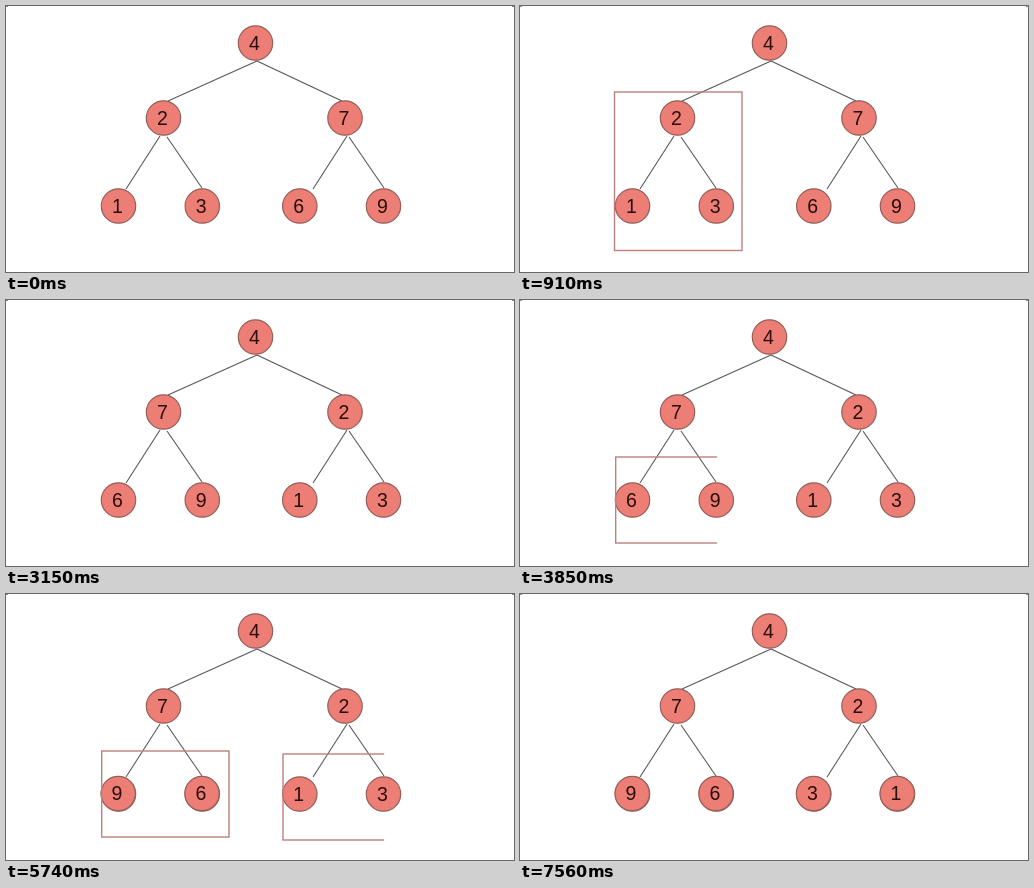
Animation, 508 px wide and 266 px high, one loop 7910 ms. Source, as an HTML page with a canvas:

```html
<!DOCTYPE html>
<html lang="en">
<head>
<meta charset="utf-8">
<title>Inverting a binary tree</title>
<style>
  html, body { margin: 0; width: 100%; height: 100%; overflow: hidden; background: #fff; }
  canvas { display: block; width: 508px; height: 266px; }
</style>
</head>
<body>
<canvas id="stage"></canvas>
<script>
const W = 508, H = 266, LOOP = 7910;
const canvas = document.getElementById('stage');
const ratio = window.devicePixelRatio || 1;
canvas.width = W * ratio;
canvas.height = H * ratio;
const ctx = canvas.getContext('2d');
ctx.scale(ratio, ratio);

// Node centres, level by level
const nodes = [
  [249.5, 37], [157.5, 112], [339, 112],
  [112.5, 200], [196.3, 200], [293.8, 200], [377.5, 200]
];
const edges = [
  [251, 55, 162, 95], [251, 55, 336, 95],
  [154, 130, 120, 183], [161, 131, 196, 182],
  [341, 130, 307, 183], [343, 131, 378, 182]
];

// Highlight boxes: left, top, right, bottom, then first and last moment
const boxes = [
  { rect: [94.5, 86, 222, 244.5], from: 350, until: 2030 },
  { rect: [275.5, 87.5, 403, 246], from: 980, until: 2030 },
  { rect: [95.7, 157, 223, 243], from: 3500, until: 7490 },
  { rect: [277, 160, 404, 246], from: 5390, until: 7490 }
];
const WIPE = 490;
const SUBTREE_SWAP = 2030;
const leafSwaps = [
  { at: 4340, first: 3, labels: '96' },
  { at: 6370, first: 5, labels: '31' }
];
const SWAP_TIME = 210;

const clamp = v => Math.max(0, Math.min(1, v));

function drawEdge([x1, y1, x2, y2]) {
  ctx.beginPath();
  ctx.moveTo(x1, y1);
  ctx.lineTo(x2, y2);
  ctx.stroke();
}

function drawDisc(x, y) {
  ctx.beginPath();
  ctx.arc(x, y, 17.2, 0, Math.PI * 2);
  ctx.fillStyle = '#ed7e75';
  ctx.fill();
  ctx.strokeStyle = '#965f5a';
  ctx.lineWidth = 1.2;
  ctx.stroke();
}

function drawNode([x, y], label) {
  drawDisc(x, y);
  ctx.fillStyle = '#2b0f0d';
  ctx.fillText(label, x - 1.2, y + 6.6);
}

function drawBox({ rect: [l, t, r, b], from, until }, time) {
  if (time < from || time >= until) return;
  const shown = clamp((time - from + 35) / WIPE);
  ctx.save();
  ctx.beginPath();
  ctx.rect(l - 2, t - 2, (r - l + 4) * shown, b - t + 4);
  ctx.clip();
  ctx.strokeStyle = '#bd807d';
  ctx.lineWidth = 1.4;
  ctx.strokeRect(l, t, r - l, b - t);
  ctx.restore();
}

function drawCorners() {
  ctx.fillStyle = '#8c8c8c';
  ctx.fillRect(0, 0, 2, 1);
  ctx.fillRect(W - 2, 0, 2, 1);
}

function draw(time) {
  ctx.fillStyle = '#fff';
  ctx.fillRect(0, 0, W, H);
  drawCorners();

  ctx.font = '19.5px "Liberation Sans", Arial, sans-serif';
  ctx.textAlign = 'center';
  ctx.strokeStyle = '#55585c';
  ctx.lineWidth = 1.1;
  edges.forEach(drawEdge);

  const labels = time < SUBTREE_SWAP ? '4271369' : '4726913';
  nodes.forEach((node, i) => drawNode(node, labels[i]));

  // Swapped leaves are laid over the old ones, a little off centre
  for (const { at, first, labels: pair } of leafSwaps) {
    if (time < at) continue;
    ctx.globalAlpha = clamp((time - at + 70) / (SWAP_TIME + 70));
    [...pair].forEach((label, i) => {
      const [x, y] = nodes[first + i];
      drawNode([x - 0.3, y - 0.5], label);
    });
    ctx.globalAlpha = 1;
  }

  boxes.forEach(box => drawBox(box, time));
}

const start = performance.now();
function frame() {
  draw((performance.now() - start) % LOOP);
  requestAnimationFrame(frame);
}
frame();
</script>
</body>
</html>
```
